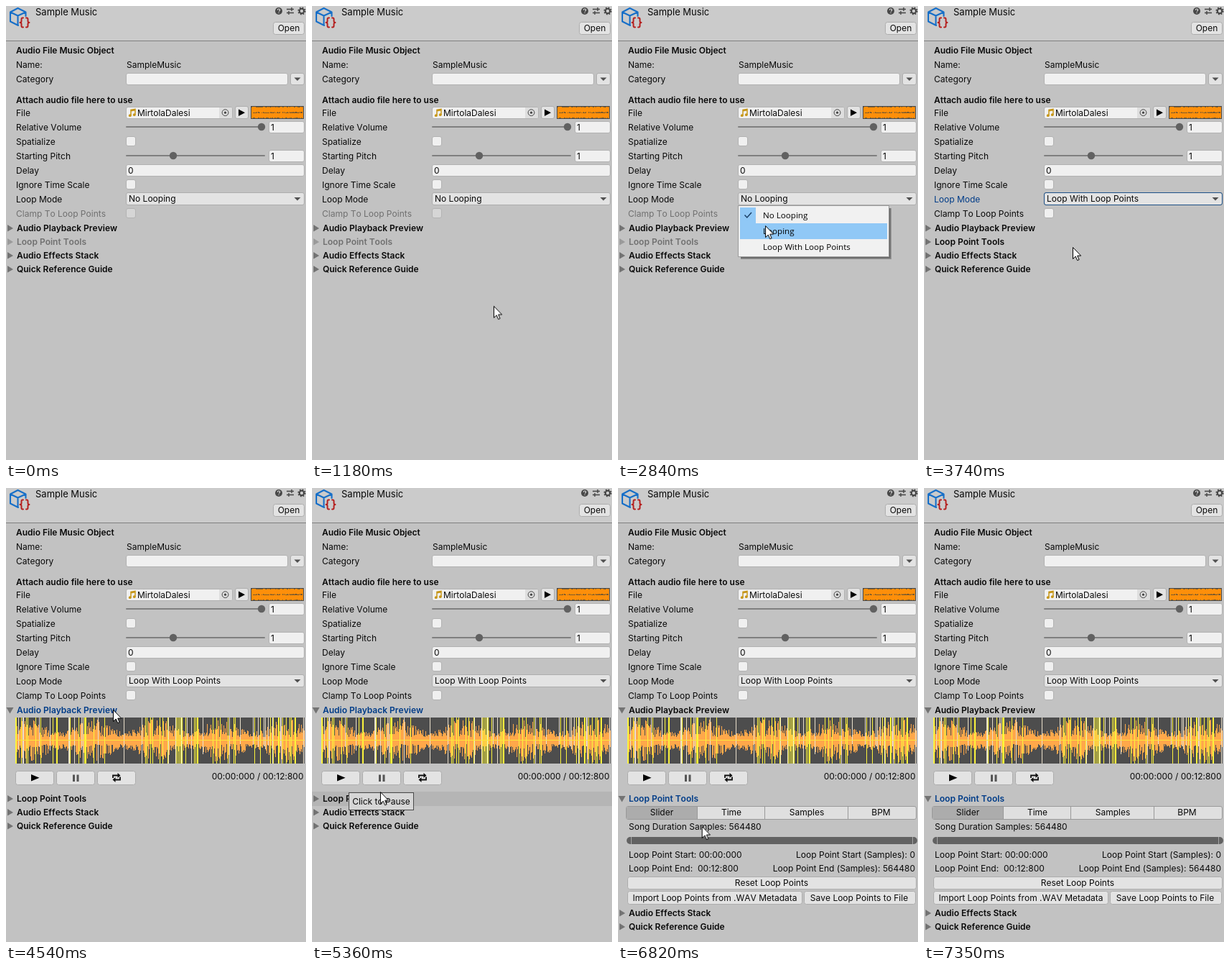
These frames come from a looping animation (418 px wide and 631 px high, 8.08 s). An HTML page:

```html
<!DOCTYPE html>
<html lang="en">
<head>
<meta charset="utf-8">
<title>Audio inspector</title>
<style>
html, body { margin: 0; width: 100%; height: 100%; overflow: hidden; background: #c2c2c2; }
svg { display: block; width: 100%; height: 100%; }
text { font: 12px Inter, sans-serif; font-kerning: none; font-feature-settings: "calt" 0; fill: #090909; white-space: pre; }
text.b { font-weight: 600; }
text.title { font-size: 13px; }
.mid { text-anchor: middle; }
.end { text-anchor: end; }
text.off { fill: #707070; }
.field { fill: #f0f0f0; stroke: #b2b2b2; }
.btn { fill: #e3e3e3; stroke: #adadad; }
.tri { fill: #737373; }
.knob { fill: #616161; }
.track { fill: #7f7f7f; }
.menu text { font: 11.6px "Open Sans", "Noto Sans", sans-serif; fill: #000; }
.hl { fill: #90c8f6; }
.line { fill: none; stroke: #444; }

/* one shared clock for every part */
.a { animation: 8080ms step-end infinite; }
.until-pick { animation-name: untilPick; }
.from-pick { animation-name: fromPick; visibility: hidden; }
.until-wave { animation-name: untilWave; }
.from-wave { animation-name: fromWave; visibility: hidden; }
.until-tools { animation-name: untilTools; }
.from-tools { animation-name: fromTools; visibility: hidden; }
.menu { animation-name: menu; visibility: hidden; }
.row1 { animation-name: row1; opacity: 0; }
.row2 { animation-name: row2; opacity: 0; }
.row3 { animation-name: row3; opacity: 0; }
.focus { animation-name: focus; visibility: hidden; }
.mode-label { animation-name: modeLabel; }
.wave-label { animation-name: waveLabel; }
.tools-label { animation-name: toolsLabel; fill: #707070; }
.tools-tri { animation-name: toolsTri; fill: #9a9a9a; }
.tools { animation-name: shiftTools; }
.rest { animation-name: shiftRest; }
.band { animation-name: band; visibility: hidden; }
.tip { animation-name: tip; visibility: hidden; }
.press { animation-name: press; visibility: hidden; }
.pointer { animation-name: pointer; visibility: hidden; }
.move { animation: move 8080ms linear infinite; }

@keyframes untilPick { 0% { visibility: visible } 41.7%, 100% { visibility: hidden } }
@keyframes fromPick { 0% { visibility: hidden } 41.7%, 100% { visibility: visible } }
@keyframes untilWave { 0% { visibility: visible } 56.18%, 100% { visibility: hidden } }
@keyframes fromWave { 0% { visibility: hidden } 56.18%, 100% { visibility: visible } }
@keyframes untilTools { 0% { visibility: visible } 77.47%, 100% { visibility: hidden } }
@keyframes fromTools { 0% { visibility: hidden } 77.47%, 100% { visibility: visible } }
@keyframes menu { 0% { visibility: hidden } 25.6% { visibility: visible } 41.2%, 100% { visibility: hidden } }
@keyframes row1 { 0% { opacity: 0 } 32.7% { opacity: 1 } 34.8%, 100% { opacity: 0 } }
@keyframes row2 { 0% { opacity: 0 } 34.8% { opacity: 1 } 37.2%, 100% { opacity: 0 } }
@keyframes row3 { 0% { opacity: 0 } 37.2%, 100% { opacity: 1 } }
@keyframes focus { 0% { visibility: hidden } 41.7% { visibility: visible } 54.57%, 100% { visibility: hidden } }
@keyframes modeLabel { 0% { fill: #090909 } 41.7% { fill: #003c88 } 54.57%, 100% { fill: #090909 } }
@keyframes waveLabel { 0% { fill: #090909 } 54.57% { fill: #003c88 } 75.49%, 100% { fill: #090909 } }
@keyframes toolsLabel { 0% { fill: #707070 } 41.7% { fill: #090909 } 75.49%, 100% { fill: #003c88 } }
@keyframes toolsTri { 0% { fill: #9a9a9a } 41.7%, 100% { fill: #737373 } }
@keyframes shiftTools { 0% { transform: translateY(0) } 56.18%, 100% { transform: translateY(104px) } }
@keyframes shiftRest { 0% { transform: translateY(0) } 77.47%, 100% { transform: translateY(140px) } }
@keyframes band { 0% { visibility: hidden } 66.15% { visibility: visible } 77.47%, 100% { visibility: hidden } }
@keyframes tip { 0% { visibility: hidden } 65% { visibility: visible } 67.5%, 100% { visibility: hidden } }
@keyframes press {
  0%, 27.1%, 41.2%, 56.18%, 77.47%, 100% { visibility: hidden }
  24.75%, 39.48%, 54.57%, 75.49% { visibility: visible }
}
@keyframes pointer { 0% { visibility: hidden } 4.45% { visibility: visible } 90.96%, 100% { visibility: hidden } }
@keyframes move {
  0%, 4.45% { transform: translate(338px, 622px) }
  14.23% { transform: translate(257px, 423px) }
  14.6% { transform: translate(253px, 417px); animation-timing-function: cubic-bezier(.33, .37, .6, 1) }
  23.88% { transform: translate(196px, 269px) }
  31.55% { transform: translate(196px, 269px); animation-timing-function: cubic-bezier(.4, .25, .7, .7) }
  35.15% { transform: translate(205px, 305px); animation-timing-function: cubic-bezier(.3, .4, .6, 1) }
  39.23% { transform: translate(207px, 335px) }
  46.28% { transform: translate(207px, 335px); animation-timing-function: cubic-bezier(.4, .1, .55, 1) }
  52.35% { transform: translate(149px, 308px) }
  57.67% { transform: translate(149px, 308px); animation-timing-function: cubic-bezier(.4, .1, .7, .75) }
  66.33% { transform: translate(95px, 422px); animation-timing-function: cubic-bezier(.25, .5, .5, 1) }
  70.54% { transform: translate(84px, 437px) }
  82.05% { transform: translate(84px, 437px); animation-timing-function: cubic-bezier(.4, .15, .7, .75) }
  90.96%, 100% { transform: translate(277px, 632px) }
}
</style>
</head>
<body>
<svg viewBox="0 0 418 631">
  <defs>
    <path id="shut" d="M2 -5 10 0 2 4.5Z"/>
    <path id="open" d="M.5 -4H10.5L5.5 4.5Z"/>
    <rect id="box" x="167.5" y="-6.5" width="13" height="13" rx="2.5"/>
    <path id="down" d="M-4.5 -2H4.5L0 2.5Z" fill="#505050"/>
  </defs>

  <rect width="418" height="631" fill="#c2c2c2"/>
  <rect width="418" height="48" fill="#cbcbcb"/>
  <rect y="48" width="418" height="1" fill="#7f7f7f"/>

  <!-- header -->
  <g fill="none" stroke-linejoin="round" stroke-linecap="round">
    <path d="M17 27 6 21.5V8.5L16.5 3 27.5 8.5V14M6 8.5 16.5 13.5 27.5 8.5M16.5 13.5V26" stroke="#176fc8" stroke-width="2.1"/>
    <path d="M24 16.5H23Q21.5 16.5 21.5 18.5V21Q21.5 23 19.5 23 21.5 23 21.5 25V27.5Q21.5 29.5 23 29.5H24M28 16.5H29Q30.5 16.5 30.5 18.5V21Q30.5 23 32.5 23 30.5 23 30.5 25V27.5Q30.5 29.5 29 29.5H28" stroke="#b5201f" stroke-width="2"/>
  </g>
  <text class="title" x="41" y="13">Sample Music</text>
  <circle cx="380" cy="7" r="5" fill="#484848"/>
  <path d="M378.3 5.7Q378.5 4 380 4T381.7 5.6Q381.7 6.5 380 7.5M380 9V10" fill="none" stroke="#ddd" stroke-width="1.2"/>
  <path class="line" d="M391 4.5H401M391 9.5H401M398 2V7M394 7V12" stroke-width="1.4"/>
  <circle class="line" cx="412" cy="7" r="3.2" stroke-width="2"/>
  <circle class="line" cx="412" cy="7" r="4.7" stroke-width="1.8" stroke-dasharray="1.85"/>
  <rect class="btn" x="372.5" y="22.5" width="43" height="17" rx="3"/>
  <text class="mid" x="394" y="35">Open</text>

  <!-- properties -->
  <text class="b" x="14" y="66">Audio File Music Object</text>
  <text x="14" y="86">Name:</text>
  <text x="168" y="86">SampleMusic</text>
  <text x="14" y="106">Category</text>
  <rect class="field" x="167.5" y="93.5" width="225" height="16" rx="2.5"/>
  <rect class="btn" x="396.5" y="93.5" width="19" height="16" rx="2.5"/>
  <use href="#down" x="406" y="101.5"/>

  <text class="b" x="14" y="135">Attach audio file here to use</text>
  <text x="14" y="153">File</text>
  <rect class="field" x="167.5" y="140.5" width="148" height="16" rx="2.5"/>
  <path d="M297 141H313Q315 141 315 143V154Q315 156 313 156H297Z" fill="#dedede"/>
  <path d="M174 152V144.5L180 143.5V151" fill="none" stroke="#c69619" stroke-width="1.5"/>
  <path d="M174 145.5 180 144.5" stroke="#c69619" stroke-width="2"/>
  <circle cx="172.8" cy="152.2" r="1.9" fill="#c69619"/>
  <circle cx="178.8" cy="151.2" r="1.9" fill="#c69619"/>
  <text x="183" y="153">MirtolaDalesi</text>
  <circle class="line" cx="305.5" cy="148.2" r="4.4"/>
  <circle cx="305.5" cy="148.2" r="1.6" fill="#444"/>
  <rect class="btn" x="319.5" y="139.5" width="18" height="17" rx="2.5"/>
  <path d="M324 143.5 333 148.3 324 153Z"/>
  <rect x="341" y="139" width="74" height="18" fill="#4b4b4b"/>
  <rect x="342" y="140" width="72" height="16" fill="#ff8f0a"/>
  <path id="mini" fill="none" stroke="#7d5c2c" shape-rendering="crispEdges"/>

  <text x="14" y="173">Relative Volume</text>
  <rect class="track" x="167" y="167" width="194" height="2" rx="1"/>
  <circle class="knob" cx="356" cy="168" r="5.2"/>
  <rect class="field" x="366.5" y="160.5" width="49" height="16" rx="2.5"/>
  <text x="369" y="173">1</text>

  <text x="14" y="193">Spatialize</text>
  <use href="#box" y="188" class="field"/>

  <text x="14" y="213">Starting Pitch</text>
  <rect class="track" x="167" y="207" width="194" height="2" rx="1"/>
  <circle class="knob" cx="233" cy="208" r="5.2"/>
  <rect class="field" x="366.5" y="200.5" width="49" height="16" rx="2.5"/>
  <text x="369" y="213">1</text>

  <text x="14" y="233">Delay</text>
  <rect class="field" x="167.5" y="220.5" width="248" height="16" rx="2.5"/>
  <text x="170" y="233">0</text>

  <text x="14" y="253">Ignore Time Scale</text>
  <use href="#box" y="248" class="field"/>

  <text class="a mode-label" x="14" y="273">Loop Mode</text>
  <rect class="btn" x="167.5" y="259.5" width="248" height="17" rx="2.5"/>
  <rect class="a focus" x="167.5" y="259.5" width="248" height="17" rx="2.5" fill="none" stroke="#1d5087"/>
  <use href="#down" x="406" y="268"/>
  <text class="a until-pick" x="171" y="272">No Looping</text>
  <text class="a from-pick" x="171" y="272">Loop With Loop Points</text>

  <g class="a until-pick">
    <text class="off" x="14" y="293">Clamp To Loop Points</text>
    <use href="#box" y="288" fill="#d6d6d6" stroke="#b3b3b3"/>
  </g>
  <g class="a from-pick">
    <text x="14" y="293">Clamp To Loop Points</text>
    <use href="#box" y="288" class="field"/>
  </g>

  <!-- playback preview -->
  <use href="#shut" y="309" class="tri a until-wave"/>
  <use href="#open" y="309" class="tri a from-wave"/>
  <text class="b a wave-label" x="15" y="313">Audio Playback Preview</text>
  <g class="a from-wave">
    <rect x="13" y="319" width="403" height="64" fill="#4d4d4d"/>
    <g fill="none" shape-rendering="crispEdges">
      <path id="amber" stroke="#ffa84a"/>
      <path id="pale" stroke="#e9dfcb"/>
      <path id="lemon" stroke="#fbf43c"/>
      <path d="M13 350.5H416" stroke="#fbe83c"/>
    </g>
    <rect class="btn" x="13.5" y="393.5" width="53" height="19" rx="3"/>
    <rect class="btn" x="70.5" y="393.5" width="53" height="19" rx="3"/>
    <rect class="btn" x="127.5" y="393.5" width="53" height="19" rx="3"/>
    <path d="M35 398 46.5 402.7 35 407.5Z"/>
    <path d="M93 398.5H96V408H93ZM98.5 398.5H101.5V408H98.5Z" fill="#555"/>
    <path d="M149 403V399.5H156M159 401.5V405.5H152" fill="none" stroke="#111" stroke-width="1.8"/>
    <path d="M155.5 396 159.5 399.5 155.5 403ZM152.5 402 148.5 405.5 152.5 409Z" fill="#111"/>
    <text class="end" x="414.5" y="405">00:00:000 / 00:12:800</text>
  </g>

  <!-- lower sections -->
  <rect class="a band" y="422" width="418" height="20" fill="#b5b5b5"/>
  <g class="a tools">
    <g class="a until-tools"><use href="#shut" y="328" class="a tools-tri"/></g>
    <use href="#open" y="328" class="tri a from-tools"/>
    <text class="b a tools-label" x="15" y="332">Loop Point Tools</text>
    <g class="a rest">
      <use href="#shut" y="347" class="tri"/>
      <text class="b" x="15" y="351">Audio Effects Stack</text>
      <use href="#shut" y="366" class="tri"/>
      <text class="b" x="15" y="370">Quick Reference Guide</text>
    </g>
  </g>

  <g class="a from-tools">
    <rect x="11.5" y="442.5" width="404" height="18" rx="2.5" fill="#dfdfdf" stroke="#999"/>
    <path d="M14 443H110V460H14Q12 460 12 458V445Q12 443 14 443Z" fill="#acacac"/>
    <path d="M110.5 443V460M204.5 443V460M320.5 443V460" stroke="#999"/>
    <text class="mid" x="61" y="455">Slider</text>
    <text class="mid" x="158" y="455">Time</text>
    <text class="mid" x="263" y="455">Samples</text>
    <text class="mid" x="366.5" y="455">BPM</text>
    <text x="15" y="475">Song Duration Samples: 564480</text>
    <rect x="12" y="485" width="405" height="10" rx="5" fill="#626262"/>
    <path d="M18.5 485V495M410.5 485V495" stroke="#a5a5a5"/>
    <text x="15" y="514">Loop Point Start: 00:00:000</text>
    <text class="end" x="414" y="514">Loop Point Start (Samples): 0</text>
    <text x="15" y="533">Loop Point End:</text>
    <text x="111" y="533">00:12:800</text>
    <text class="end" x="414" y="533">Loop Point End (Samples): 564480</text>
    <rect class="btn" x="13.5" y="540.5" width="402" height="17" rx="3"/>
    <text class="mid" x="214" y="553">Reset Loop Points</text>
    <rect class="btn" x="13.5" y="560.5" width="243" height="18" rx="3"/>
    <text class="mid" x="135" y="574">Import Loop Points from .WAV Metadata</text>
    <rect class="btn" x="259.5" y="560.5" width="155" height="18" rx="3"/>
    <text class="mid" x="336" y="574">Save Loop Points to File</text>
  </g>

  <!-- drop-down list -->
  <g class="a menu">
    <rect x="171" y="281" width="210" height="71" fill="#000" opacity=".25"/>
    <rect x="171" y="281" width="208.5" height="69.5" fill="#000" opacity=".3"/>
    <rect x="167.5" y="277.5" width="210" height="71" fill="#f1f1f1" stroke="#9c9c9c"/>
    <rect class="hl" x="170" y="280" width="22" height="22"/>
    <rect class="hl a row1" x="170" y="280" width="205" height="22"/>
    <rect class="hl a row2" x="170" y="302" width="205" height="22"/>
    <rect class="hl a row3" x="170" y="324" width="205" height="22"/>
    <path d="M176.5 290.5 179.8 294 186 287" fill="none" stroke="#1b3f66" stroke-width="1.5"/>
    <text x="202" y="295">No Looping</text>
    <text x="202" y="317">Looping</text>
    <text x="202" y="339">Loop With Loop Points</text>
  </g>

  <g class="a tip">
    <rect x="51.5" y="423.5" width="90" height="24" fill="#d6d6d6" stroke="#4a4a4a"/>
    <text class="mid" x="96.5" y="440">Click to Pause</text>
  </g>

  <g class="move">
    <circle class="a press" r="12" fill="#e6df2c" opacity=".68"/>
    <path class="a pointer" d="M.5 .5V16.5L4.2 13 6.7 18.6 9.1 17.6 6.7 12.1H11.7Z" fill="#fff" stroke="#000"/>
  </g>
</svg>
<script>
let seed = 4217;
const rnd = () => (seed = seed * 16807 % 2147483647) / 2147483647;
const bar = (x, mid, up, low = up) => `M${x + .5} ${Math.round(mid - up)}V${Math.round(mid + low)}`;
const draw = (id, d) => document.getElementById(id).setAttribute('d', d);

// spiky waveform: tall clipped peaks among amber bars that swell and fade
const bars = { amber: '', pale: '', lemon: '' };
for (let x = 13; x < 416; x++) {
  const swell = .62 + .33 * Math.cos((x - 120) / 14.3);
  const pick = rnd();
  const up = 5 + 27 * swell * rnd() ** 1.2;
  const low = 5 + 27 * swell * rnd() ** 1.2;
  if (pick < .15) bars.lemon += bar(x, 351, 32);
  else if (pick < .22) bars.pale += bar(x, 351, 32, rnd() < .6 ? 32 : low);
  else bars.amber += bar(x, 351, up, low);
}
for (const id in bars) draw(id, bars[id]);

let nicks = '';
for (let x = 342; x < 414; x++) {
  if (rnd() < .5) nicks += bar(x, 140, 0, 1);
  if (rnd() < .5) nicks += bar(x, 156, 1, 0);
  if (rnd() < .7) nicks += bar(x, 148, rnd(), 1);
}
draw('mini', nicks);
</script>
</body>
</html>
```
